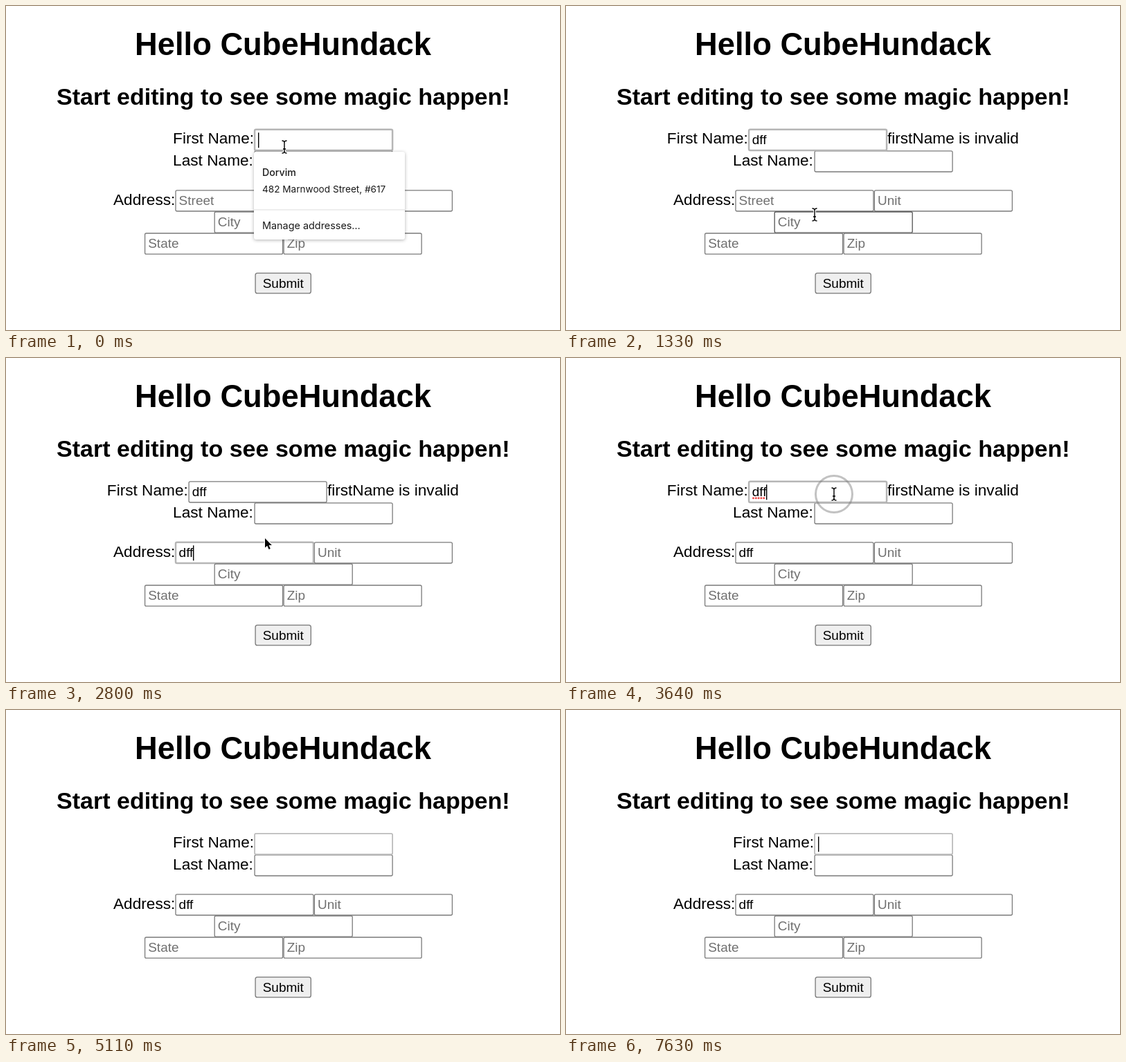
An HTML page with a canvas for the animation above (7910 ms loop, 800 px wide and 469 px high).

```html
<!DOCTYPE html>
<html lang="en">
<head>
<meta charset="utf-8">
<title>Form validation</title>
<style>
html, body { margin: 0; width: 100%; height: 100%; overflow: hidden; background: #fff; }
canvas { display: block; width: 800px; height: 469px; }
</style>
</head>
<body>
<canvas id="stage" width="800" height="469"></canvas>
<script>
const ctx = document.getElementById('stage').getContext('2d');
const LOOP = 7910, STEP = 70;
const SANS = '"Liberation Sans", Arial, sans-serif';
const UI = 'Inter, Roboto, sans-serif';
const FIELD_W = 200, FIELD_H = 31.2, LABEL = 22.65;

// Each list holds [start time, value] pairs.
const firstName = [[0, ''], [70, 'd'], [420, 'df'], [630, 'dff'], [4060, 'df'], [4200, 'd'], [4410, ''],
  [5250, 'd'], [5390, 'df'], [5530, 'dff'], [5950, 'df'], [6090, 'd'], [6440, '']];
const street = [[0, ''], [1960, 'd'], [2170, 'df'], [2450, 'dff']];
const focus = [[0, 'first'], [1680, 'street'], [3500, 'first']];
const popup = [[0, 'address'], [70, 'history'], [630, ''], [1750, 'address'], [1960, 'history'], [2240, ''],
  [4060, 'history'], [4550, ''], [5250, 'history'], [5530, ''], [5950, 'history'], [6580, '']];
const blinkStart = [[0, 0], [630, 630], [1680, 1680], [2170, 2170], [2450, 2450], [3500, 3500],
  [4060, 4060], [4550, 4550], [5250, 5250], [5390, 5390], [6580, 6580]];
const pointerRuns = [
  [[0, 402, 204], [70, 402, 204]],
  [[910, 402, 206], [1120, 381, 255], [1330, 359, 302], [1540, 364, 284], [1960, 364, 284]],
  [[2660, 366, 282], [2800, 374, 261], [3080, 381, 232], [3430, 387, 197], [4060, 387, 197]]
];
const clicks = [[1680, 364, 284], [3500, 387, 197]];

const valueAt = (list, t) => list.reduce((v, [start, next]) => t >= start ? next : v, list[0][1]);

function write(str, x, y, size, color = '#000', weight = 400, family = SANS) {
  ctx.font = `${weight} ${size}px ${family}`;
  ctx.fillStyle = color;
  ctx.fillText(str, x, y);
}

function widthOf(str, size) {
  ctx.font = `400 ${size}px ${SANS}`;
  return ctx.measureText(str).width;
}

function box(x, y, w, h, r, fill, stroke, line = 1.3) {
  ctx.beginPath();
  ctx.roundRect(x, y, w, h, r);
  ctx.fillStyle = fill;
  ctx.fill();
  if (!stroke) return;
  ctx.strokeStyle = stroke;
  ctx.lineWidth = line;
  ctx.stroke();
}

function field(x, y, hint, opts = {}) {
  const { value = '', focused, quiet, caret, misspelt, pointer } = opts;
  const over = pointer && pointer.x > x && pointer.x < x + FIELD_W && pointer.y > y && pointer.y < y + FIELD_H;
  const color = focused ? (quiet ? '#bcbcbc' : '#b6b6b6') : over ? '#555' : '#7b7b7b';
  box(x + .6, y + .5, FIELD_W - 1, FIELD_H - 1, 2, '#fff', color, focused ? (quiet ? 1.8 : 2.5) : 1.3);
  const base = y + 21.7;
  if (value || hint) write(value || hint, x + 5.2, base, 19, value ? '#000' : '#707070');
  if (misspelt) {
    ctx.fillStyle = '#ef4b48';
    for (let i = 0; i < 5; i++) {
      ctx.beginPath();
      ctx.arc(x + 7 + i * 3.8, base + 2.7, 1.5, 0, 7);
      ctx.fill();
    }
  }
  if (caret) {
    ctx.fillStyle = '#000';
    ctx.fillRect(Math.round(x + 5.2 + widthOf(value, 19)), y + 5, 1.4, 22);
  }
}

function card(x, y, h) {
  ctx.save();
  ctx.shadowColor = 'rgba(0,0,0,.3)';
  ctx.shadowBlur = 5;
  ctx.shadowOffsetY = 1;
  box(x, y, 218, h, 3, '#fff');
  ctx.restore();
}

function drawPopup(kind, x, y) {
  const line = (str, dy, size, weight = 400) => write(str, x + 12, y + dy, size, '#1a1a1a', weight, UI);
  if (kind === 'history') {
    card(x, y, 58);
    line('df', 34.5, 14.4);
  } else if (kind === 'address') {
    card(x, y, 127);
    line('Dorvim', 34.5, 14.2, 500);
    line('482 Marnwood Street, #617', 58.5, 13.6);
    ctx.fillStyle = '#ddd';
    ctx.fillRect(x, y + 83.5, 218, 1);
    line('Manage addresses…', 111.5, 14.4);
  }
}

function pointerAt(t) {
  const run = pointerRuns.find(r => t >= r[0][0] && t < r[r.length - 1][0]);
  if (!run) return null;
  const i = run.findIndex(k => k[0] > t);
  const [t0, x0, y0] = run[i - 1], [t1, x1, y1] = run[i];
  const p = (t - t0) / (t1 - t0);
  return { x: x0 + (x1 - x0) * p, y: y0 + (y1 - y0) * p };
}

function drawPointer({ x, y }) {
  const inField = (y > 178 && y < 240) || (y > 266 && y < 359);
  ctx.save();
  ctx.translate(x, y);
  ctx.lineJoin = 'round';
  const shape = new Path2D(inField
    ? 'M-3.5-9Q0-9 0-6Q0-9 3.5-9M0-6V6M-3.5 9Q0 9 0 6Q0 9 3.5 9M-2 3H2'
    : 'M0 0V13.6L3.2 10.8L5.6 16L7.8 15L5.6 9.9H9.9Z');
  ctx.strokeStyle = '#fff';
  ctx.lineWidth = inField ? 3.6 : 2.6;
  ctx.stroke(shape);
  if (inField) {
    ctx.strokeStyle = '#000';
    ctx.lineWidth = 1.4;
    ctx.stroke(shape);
  } else {
    ctx.fillStyle = '#000';
    ctx.fill(shape);
  }
  ctx.restore();
}

function drawClick(t) {
  for (const [start, x, y] of clicks) {
    const age = t - start;
    if (age < 0 || age >= 420) continue;
    ctx.beginPath();
    ctx.arc(x, y, 26.5, 0, 7);
    ctx.strokeStyle = `rgba(120,120,120,${.45 * Math.min(1, (420 - age) / 280)})`;
    ctx.lineWidth = 3;
    ctx.stroke();
  }
}

function draw(t) {
  const name = valueAt(firstName, t), road = valueAt(street, t);
  const active = valueAt(focus, t), open = valueAt(popup, t);
  const caretOn = (t - valueAt(blinkStart, t)) % 1000 < 500;
  const pointer = pointerAt(t);

  ctx.fillStyle = '#fff';
  ctx.fillRect(0, 0, 800, 469);
  ctx.textAlign = 'center';
  write('Hello CubeHundack', 400, 70.5, 45.3, '#000', 700);
  write('Start editing to see some magic happen!', 400.3, 142.6, 34.05, '#000', 700);
  ctx.textAlign = 'left';

  const firstX = name ? 263.5 : 358.5;
  write('First Name:', name ? 145.8 : 241.1, 199.2, LABEL);
  if (name) write('firstName is invalid', 463.9, 199.2, LABEL);
  write('Last Name:', 241.1, 231, LABEL);
  write('Address:', 155, 287.6, LABEL);

  field(358.5, 209.3, '', { pointer });
  field(firstX, 178.3, '', {
    value: name, focused: active === 'first', quiet: !name && !open,
    caret: active === 'first' && caretOn, misspelt: t >= 3500 && t < 4060, pointer
  });
  field(444.8, 266.3, 'Unit', { pointer });
  field(244.4, 266.3, 'Street', {
    value: road, focused: active === 'street', caret: active === 'street' && caretOn, pointer
  });
  field(300.6, 297.5, 'City', { pointer });
  field(200, 328.5, 'State', { pointer });
  field(400.5, 328.5, 'Zip', { pointer });

  box(360.1, 386.6, 80.2, 29.3, 3, '#efefef', '#777');
  write('Submit', 370.7, 407.5, 19);

  if (active === 'first') drawPopup(open, firstX - .5, 211);
  else drawPopup(open, 244, 299);
  drawClick(t);
  if (pointer) drawPointer(pointer);
}

const start = performance.now();
function tick() {
  const t = (performance.now() - start) % LOOP;
  draw(Math.floor(t / STEP) * STEP);
  requestAnimationFrame(tick);
}
tick();
</script>
</body>
</html>
```
